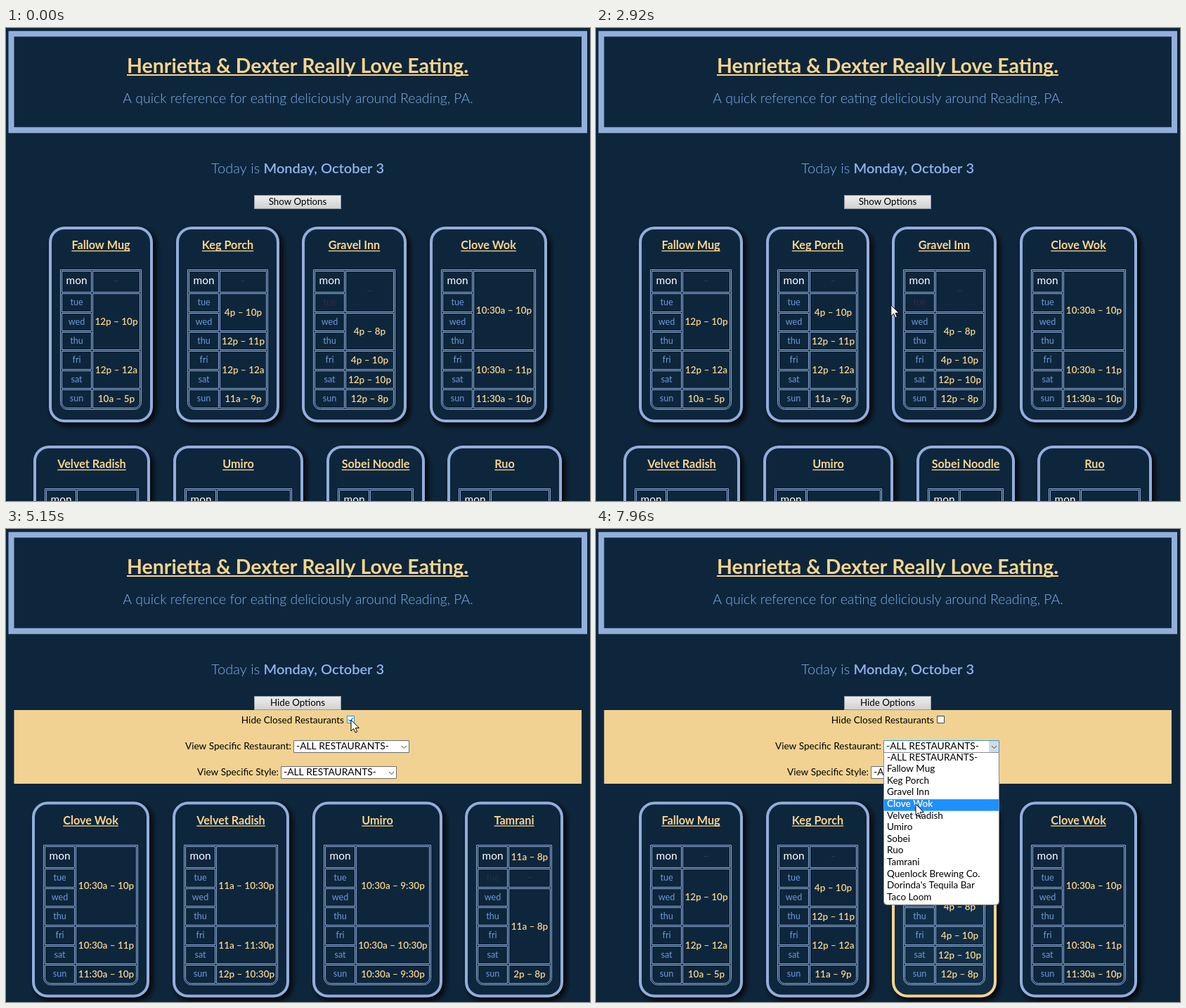
Animation of 831 by 674 pixels, one loop 8000 ms. Source, as an HTML page with a canvas:

```html
<!DOCTYPE html>
<html lang="en">
<head>
<meta charset="utf-8">
<title>Restaurant hours</title>
<style>
html, body { margin: 0; width: 100%; height: 100%; overflow: hidden; background: #0e263c; }
canvas { display: block; }
</style>
</head>
<body>
<canvas id="stage" width="831" height="674"></canvas>
<script>
const ctx = document.getElementById('stage').getContext('2d');
const LOOP = 8000, WIDTH = 831, CENTER = 415.4, CARD_HEIGHT = 279, CARD_GAP = 32.7;
const NAVY = '#0e263c', BLUE = '#92aedb', GOLD = '#f7d58c', PANEL = '#f1d292';
const DAYS = ['mon', 'tue', 'wed', 'thu', 'fri', 'sat', 'sun'];
const ROW_LINES = [62, 94, 122, 149, 176, 204, 231, 259];
const ALL = '-ALL RESTAURANTS-';

// Hours are "days|text" spans; an empty text means closed.
const card = (name, width, ...spans) => ({
  name, width,
  spans: spans.map(s => s.split('|')).map(([days, text]) => ({ days: +days, text })),
});
const mug = card('Fallow Mug', 148, '1|', '3|12p – 10p', '2|12p – 12a', '1|10a – 5p');
const keg = card('Keg Porch', 147, '1|', '2|4p – 10p', '1|12p – 11p', '2|12p – 12a', '1|11a – 9p');
const inn = card('Gravel Inn', 149, '2|', '2|4p – 8p', '1|4p – 10p', '1|12p – 10p', '1|12p – 8p');
const wok = card('Clove Wok', 167, '4|10:30a – 10p', '2|10:30a – 11p', '1|11:30a – 10p');
const radish = card('Velvet Radish', 166, '4|11a – 10:30p', '2|11a – 11:30p', '1|12p – 10:30p');
const umiro = card('Umiro', 185, '4|10:30a – 9:30p', '2|10:30a – 10:30p', '1|10:30a – 9:30p');
const noodle = card('Sobei Noodle', 140, '2|', '5|11a – 9p');
const ruo = card('Ruo', 163, '2|', '5|11a – 10p');
const tamrani = card('Tamrani', 140, '1|11a – 8p', '1|', '4|11a – 8p', '1|2p – 8p');

const ROW_ONE = [mug, keg, inn, wok];
const ROW_TWO = [radish, umiro, noodle, ruo];
const OPEN_ROW = [wok, radish, umiro, tamrani];
const MENU = [ALL, ...ROW_ONE.map(c => c.name), 'Velvet Radish', 'Umiro', 'Sobei', 'Ruo', 'Tamrani',
  'Quenlock Brewing Co.', "Dorinda's Tequila Bar", 'Taco Loom'];
const MENU_TOP = 318.7, MENU_STEP = 16.6;

// Pointer path: time, x, y
const PATH = [
  [0, 720, 1000], [769, 720, 1000], [770, 715, 690], [980, 330, 690], [1190, 150, 650], [1540, 130, 490],
  [1620, 133, 485], [2170, 268, 415], [2390, 308, 412], [2640, 308, 412], [3040, 450, 390], [3390, 451, 262],
  [3460, 450, 254], [3590, 448, 247], [4520, 448, 247], [4870, 491, 272], [6480, 491, 272], [6830, 471, 307],
  [7280, 471, 307], [7960, 455, 392], [8000, 455, 392],
];
const CLICKS = [[3530, 3730], [4940, 5080], [6340, 6480], [6890, 7020]];
const PANEL_OPEN = 3730, CHECKED = 5080, UNCHECKED = 6480, MENU_OPEN = 7020;

const ARROW = new Path2D('M0 0V16L3.7 12.5L6.2 18L8.7 17L6.3 11.5H11.3Z');
const HAND = new Path2D('M-1.7 12V1.5Q-1.7 0 0 0T1.7 1.5V7Q4 6 4.7 8Q7 7 7.5 9Q9.5 8.5 9.5 11V14' +
  'Q9.5 17 8 18.5V20.5H0V18.5L-5 12.5Q-6 10 -3.5 10.3Z');

const within = (t, from, to) => t >= from && t < to;
const inBox = (p, x, y, w, h) => p.x >= x && p.x < x + w && p.y >= y && p.y < y + h;

function pointerAt(t) {
  const i = PATH.findIndex(k => k[0] > t);
  const [t0, x0, y0] = PATH[i - 1], [t1, x1, y1] = PATH[i];
  const u = (t - t0) / (t1 - t0), e = u * u * (3 - 2 * u);
  return { x: x0 + (x1 - x0) * e, y: y0 + (y1 - y0) * e };
}

function rect(x, y, w, h, fill) {
  ctx.fillStyle = fill;
  ctx.fillRect(x, y, w, h);
}

function frame(x, y, w, h, color, radius = 0) {
  ctx.strokeStyle = color;
  ctx.lineWidth = 1;
  ctx.beginPath();
  ctx.roundRect(x + 0.5, y + 0.5, w - 1, h - 1, radius);
  ctx.stroke();
}

function rounded(x, y, w, h, radius, fill) {
  ctx.fillStyle = fill;
  ctx.beginPath();
  ctx.roundRect(x, y, w, h, radius);
  ctx.fill();
}

function text(str, x, y, size, color, weight = 400, align = 'center') {
  ctx.font = `${weight} ${size}px Lato, sans-serif`;
  ctx.textAlign = align;
  ctx.fillStyle = color;
  ctx.fillText(str, x, y);
  return ctx.measureText(str).width;
}

function underlined(str, x, y, size, gap, thickness) {
  const w = text(str, x, y, size, GOLD, 700);
  rect(x - w / 2, y + gap, w, thickness, GOLD);
}

function drawHeader() {
  rect(3.5, 4.3, 823.5, 145.4, BLUE);
  rect(11.5, 12.3, 807.5, 129, NAVY);
  underlined('Henrietta & Dexter Really Love Eating.', 415, 64, 28.5, 2, 2);
  text('A quick reference for eating deliciously around Reading, PA.', 415.5, 107, 19.5, '#7fade8', 300);
  text('Today is', 292, 207, 20, '#7fade8', 300, 'left');
  text('Monday, October 3', 538, 207, 20, '#8fb3ea', 600, 'right');
}

function drawTable(x, y, width, spans) {
  const left = x + 17, mid = x + 61, right = x + width - 18;
  const cell = (a, b, from, to) => {
    const top = y + ROW_LINES[from], bottom = y + ROW_LINES[to];
    const corner = to < 7 ? 0 : a === left ? [0, 0, 0, 8] : [0, 0, 8, 0];
    frame(a + 1, top + 1, b - a - 1, bottom - top - 1, BLUE, corner);
    return { x: (a + b) / 2 + 0.5, y: (top + bottom) / 2 };
  };
  frame(left - 1, y + 61, right - left + 3, 200, BLUE, [0, 0, 10, 10]);
  let row = 0;
  for (const { days, text: hours } of spans) {
    const c = cell(mid, right, row, row + days);
    if (hours) text(hours, c.x, c.y + 5, 13.5, GOLD, 600);
    else text('–', c.x, c.y + 4, 13.5, '#303c4c');
    for (const end = row + days; row < end; row++) {
      const d = cell(left, mid, row, row + 1);
      if (row === 0) text(DAYS[0], d.x, d.y + 4, 15.4, '#fff');
      else text(DAYS[row], d.x, d.y + 4, 12.6, hours ? '#6c99d8' : '#2c2c40');
    }
  }
}

function drawRow(cards, y, pointer) {
  const total = cards.reduce((sum, c) => sum + c.width, CARD_GAP * (cards.length - 1));
  let left = CENTER - total / 2, hovered = false;
  for (const { name, width, spans } of cards) {
    const x = Math.round(left), over = inBox(pointer, x, y, width, CARD_HEIGHT);
    hovered ||= over;
    ctx.save();
    ctx.shadowColor = '#000';
    ctx.shadowBlur = 10;
    ctx.shadowOffsetX = ctx.shadowOffsetY = 4;
    rounded(x, y, width, CARD_HEIGHT, 22, over ? GOLD : BLUE);
    ctx.restore();
    rounded(x + 4, y + 4, width - 8, CARD_HEIGHT - 8, 18, over ? '#122e46' : NAVY);
    underlined(name, x + width / 2, y + 32, 16.2, 2, 1.3);
    drawTable(x, Math.round(y), width, spans);
    left += width + CARD_GAP;
  }
  return hovered;
}

function drawButton(label, over) {
  const shade = ctx.createLinearGradient(0, 238, 0, 258);
  shade.addColorStop(0, '#eeeeee');
  shade.addColorStop(1, '#d0d0d0');
  rect(353, 238, 124, 20, over ? '#36b3e4' : shade);
  frame(353, 238, 124, 20, over ? '#1c86b4' : '#8d99a6');
  text(label, 415, 252, 13.3, '#000');
}

function drawSelect(x, y, over) {
  rect(x, y, 165, 18, '#fff');
  if (over) rect(x + 150, y + 1, 14, 16, '#cfdce6');
  frame(x, y, 165, 18, over ? '#3199d6' : '#6d6d6d');
  text(ALL, x + 4, y + 13, 13.8, '#000', 400, 'left');
  ctx.strokeStyle = '#444';
  ctx.beginPath();
  ctx.moveTo(x + 154, y + 8);
  ctx.lineTo(x + 157.5, y + 11.5);
  ctx.lineTo(x + 161, y + 8);
  ctx.stroke();
}

function drawPanel(t, pointer) {
  rect(11.5, 258, 807.5, 105, PANEL);
  text('Hide Closed Restaurants', 481, 277, 13.6, '#000', 400, 'right');
  text('View Specific Restaurant:', 406, 314, 13.6, '#000', 400, 'right');
  text('View Specific Style:', 388, 351, 13.6, '#000', 400, 'right');

  const over = inBox(pointer, 485, 266, 11, 11);
  rect(485, 266, 11, 11, '#fff');
  frame(485, 266, 11, 11, over ? '#2a94d0' : '#444');
  if (within(t, CHECKED, UNCHECKED)) {
    ctx.strokeStyle = '#2a94d0';
    ctx.lineWidth = 1.5;
    ctx.beginPath();
    ctx.moveTo(487, 271.5);
    ctx.lineTo(489.5, 274);
    ctx.lineTo(494, 269);
    ctx.stroke();
    ctx.lineWidth = 1;
  }
  drawSelect(409, 301, t >= MENU_OPEN || inBox(pointer, 409, 301, 165, 18));
  drawSelect(391, 338, false);
}

function drawMenu(pointer) {
  const active = Math.max(0, Math.floor((pointer.y - MENU_TOP) / MENU_STEP));
  rounded(410, 318, 163, 217, [0, 0, 4, 4], '#fff');
  MENU.forEach((label, i) => {
    const y = MENU_TOP + i * MENU_STEP;
    if (i === active) rect(410, y, 163, MENU_STEP, '#1e90ff');
    text(label, 414, y + 10.8, 13.5, i === active ? '#fff' : '#000', i === active ? 600 : 400, 'left');
  });
  frame(409, 318, 165, 218, '#8a8a8a', [0, 0, 4, 4]);
}

function drawPointer(t, { x, y }, shape) {
  if (CLICKS.some(([from, to]) => within(t, from, to))) {
    ctx.fillStyle = 'rgba(240, 226, 20, .62)';
    ctx.beginPath();
    ctx.arc(x, y + 1, 9.5, 0, Math.PI * 2);
    ctx.fill();
  }
  ctx.save();
  ctx.translate(x, y);
  ctx.lineWidth = 1;
  ctx.strokeStyle = '#000';
  ctx.fillStyle = '#fff';
  ctx.fill(shape);
  ctx.stroke(shape);
  ctx.restore();
}

function draw(t) {
  const pointer = pointerAt(t), open = t >= PANEL_OPEN;
  rect(0, 0, WIDTH, 674, NAVY);
  drawHeader();
  drawButton(open ? 'Hide Options' : 'Show Options', inBox(pointer, 353, 238, 124, 20));
  let overCard = false;
  if (open) {
    drawRow(within(t, CHECKED, UNCHECKED) ? OPEN_ROW : ROW_ONE, 388.5, pointer);
    drawPanel(t, pointer);
    if (t >= MENU_OPEN) drawMenu(pointer);
  } else {
    const first = drawRow(ROW_ONE, 283, pointer), second = drawRow(ROW_TWO, 595, pointer);
    overCard = first || second;
  }
  drawPointer(t, pointer, overCard ? HAND : ARROW);
}

const start = performance.now();
function tick() {
  draw((performance.now() - start) % LOOP);
  requestAnimationFrame(tick);
}
tick();
</script>
</body>
</html>
```
